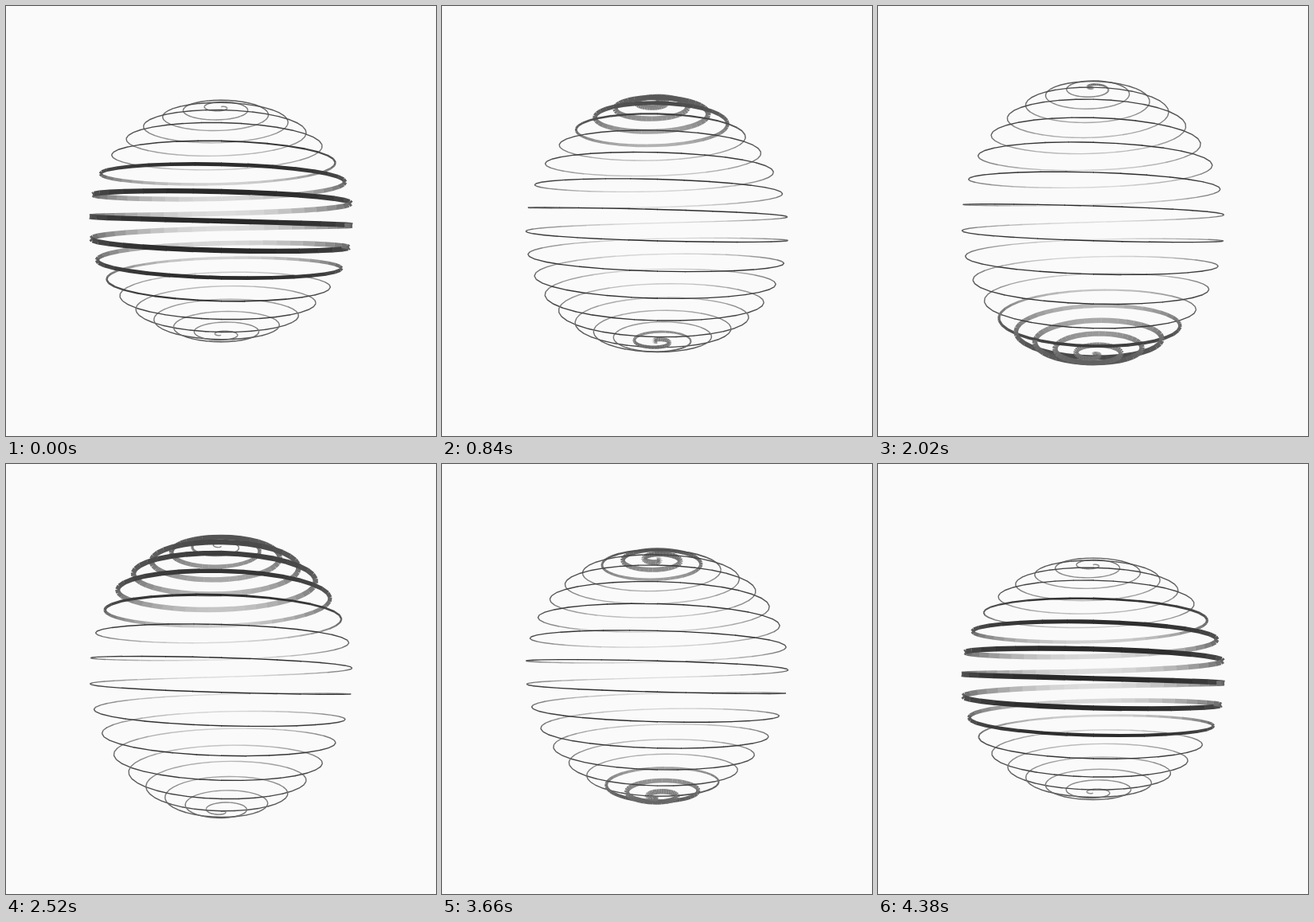
Recreate the animation shown at these times as an HTML page without scripts. Size 540 by 540 pixels, loop 4400 ms.

```html
<!DOCTYPE html>
<html lang="en">
<head>
<meta charset="utf-8">
<title>Spiral sphere</title>
<style>
/* One loop: --t runs a full circle. */
@property --t { syntax: "<angle>"; inherits: true; initial-value: 0deg; }
/* Polar angle, depth and screen point at both ends of a segment. */
@property --p1 { syntax: "<angle>"; inherits: false; initial-value: 0deg; }
@property --p2 { syntax: "<angle>"; inherits: false; initial-value: 0deg; }
@property --z1 { syntax: "<number>"; inherits: false; initial-value: 0; }
@property --z2 { syntax: "<number>"; inherits: false; initial-value: 0; }
@property --x1 { syntax: "<number>"; inherits: false; initial-value: 0; }
@property --x2 { syntax: "<number>"; inherits: false; initial-value: 0; }
@property --y1 { syntax: "<number>"; inherits: false; initial-value: 0; }
@property --y2 { syntax: "<number>"; inherits: false; initial-value: 0; }
@property --depth { syntax: "<number>"; inherits: false; initial-value: 0; }
@property --grey { syntax: "<number>"; inherits: false; initial-value: 0; }

html, body { margin: 0; width: 100%; height: 100%; overflow: hidden; background: #fafafa; }
svg { display: block; width: 540px; height: 540px; --radius: 155.5; animation: turn 4.4s linear infinite; }
@keyframes turn { to { --t: 360deg; } }

line {
  /* Azimuth: half turn --h, step --j of 9 degrees; 18 turns from pole to pole. */
  --a1: calc((var(--h) * 180 - 90 + var(--j) * 9) * 1deg);
  --a2: calc(var(--a1) + 9deg);
  --p1: clamp(0deg, (var(--a1) + var(--t)) / 36, 180deg);
  --p2: clamp(0deg, (var(--a2) + var(--t)) / 36, 180deg);
  --z1: calc(sin(var(--p1)) * cos(var(--a1)));
  --z2: calc(sin(var(--p2)) * cos(var(--a2)));

  /* Perspective from three radii away, with a vertical wave through the coil. */
  --x1: calc(var(--radius) * sin(var(--p1)) * sin(var(--a1)) / (1 - var(--z1) / 3));
  --x2: calc(var(--radius) * sin(var(--p2)) * sin(var(--a2)) / (1 - var(--z2) / 3));
  --y1: calc(var(--radius) * (0.08 * cos(var(--p1) - var(--t)) - cos(var(--p1))) / (1 - var(--z1) / 3));
  --y2: calc(var(--radius) * (0.08 * cos(var(--p2) - var(--t)) - cos(var(--p2))) / (1 - var(--z2) / 3));
  transform: matrix(
    calc(var(--x2) - var(--x1)), calc(var(--y2) - var(--y1)),
    calc(var(--y1) - var(--y2)), calc(var(--x2) - var(--x1)),
    var(--x1), var(--y1));

  --depth: calc((var(--z1) + var(--z2)) / 2);
  --grey: calc(120 - 91 * var(--depth) + 11 * var(--depth) * var(--depth));
  stroke: rgb(var(--grey), var(--grey), var(--grey));

  /* A thick band sweeps down three times per loop. */
  stroke-width: calc(1.4px + 5px * clamp(0, (-0.46 - cos(var(--p1) + var(--p2) - 3 * var(--t))) / 0.46, 1));
  vector-effect: non-scaling-stroke;
}
</style>
</head>
<body>
<svg xmlns="http://www.w3.org/2000/svg" width="540" height="540">
  <defs>
    <g id="arc">
      <line x2="1.03" style="--j:0"/>
      <line x2="1.03" style="--j:1"/>
      <line x2="1.03" style="--j:2"/>
      <line x2="1.03" style="--j:3"/>
      <line x2="1.03" style="--j:4"/>
      <line x2="1.03" style="--j:5"/>
      <line x2="1.03" style="--j:6"/>
      <line x2="1.03" style="--j:7"/>
      <line x2="1.03" style="--j:8"/>
      <line x2="1.03" style="--j:9"/>
      <line x2="1.03" style="--j:10"/>
      <line x2="1.03" style="--j:11"/>
      <line x2="1.03" style="--j:12"/>
      <line x2="1.03" style="--j:13"/>
      <line x2="1.03" style="--j:14"/>
      <line x2="1.03" style="--j:15"/>
      <line x2="1.03" style="--j:16"/>
      <line x2="1.03" style="--j:17"/>
      <line x2="1.03" style="--j:18"/>
      <line x2="1.03" style="--j:19"/>
    </g>
  </defs>
  <!-- back halves -->
  <g transform="translate(270 270)">
    <use href="#arc" style="--h:-1"/>
    <use href="#arc" style="--h:1"/>
    <use href="#arc" style="--h:3"/>
    <use href="#arc" style="--h:5"/>
    <use href="#arc" style="--h:7"/>
    <use href="#arc" style="--h:9"/>
    <use href="#arc" style="--h:11"/>
    <use href="#arc" style="--h:13"/>
    <use href="#arc" style="--h:15"/>
    <use href="#arc" style="--h:17"/>
    <use href="#arc" style="--h:19"/>
    <use href="#arc" style="--h:21"/>
    <use href="#arc" style="--h:23"/>
    <use href="#arc" style="--h:25"/>
    <use href="#arc" style="--h:27"/>
    <use href="#arc" style="--h:29"/>
    <use href="#arc" style="--h:31"/>
    <use href="#arc" style="--h:33"/>
    <use href="#arc" style="--h:35"/>
  </g>
  <!-- front halves -->
  <g transform="translate(270 270)">
    <use href="#arc" style="--h:-2"/>
    <use href="#arc" style="--h:0"/>
    <use href="#arc" style="--h:2"/>
    <use href="#arc" style="--h:4"/>
    <use href="#arc" style="--h:6"/>
    <use href="#arc" style="--h:8"/>
    <use href="#arc" style="--h:10"/>
    <use href="#arc" style="--h:12"/>
    <use href="#arc" style="--h:14"/>
    <use href="#arc" style="--h:16"/>
    <use href="#arc" style="--h:18"/>
    <use href="#arc" style="--h:20"/>
    <use href="#arc" style="--h:22"/>
    <use href="#arc" style="--h:24"/>
    <use href="#arc" style="--h:26"/>
    <use href="#arc" style="--h:28"/>
    <use href="#arc" style="--h:30"/>
    <use href="#arc" style="--h:32"/>
    <use href="#arc" style="--h:34"/>
    <use href="#arc" style="--h:36"/>
  </g>
</svg>
</body>
</html>
```
